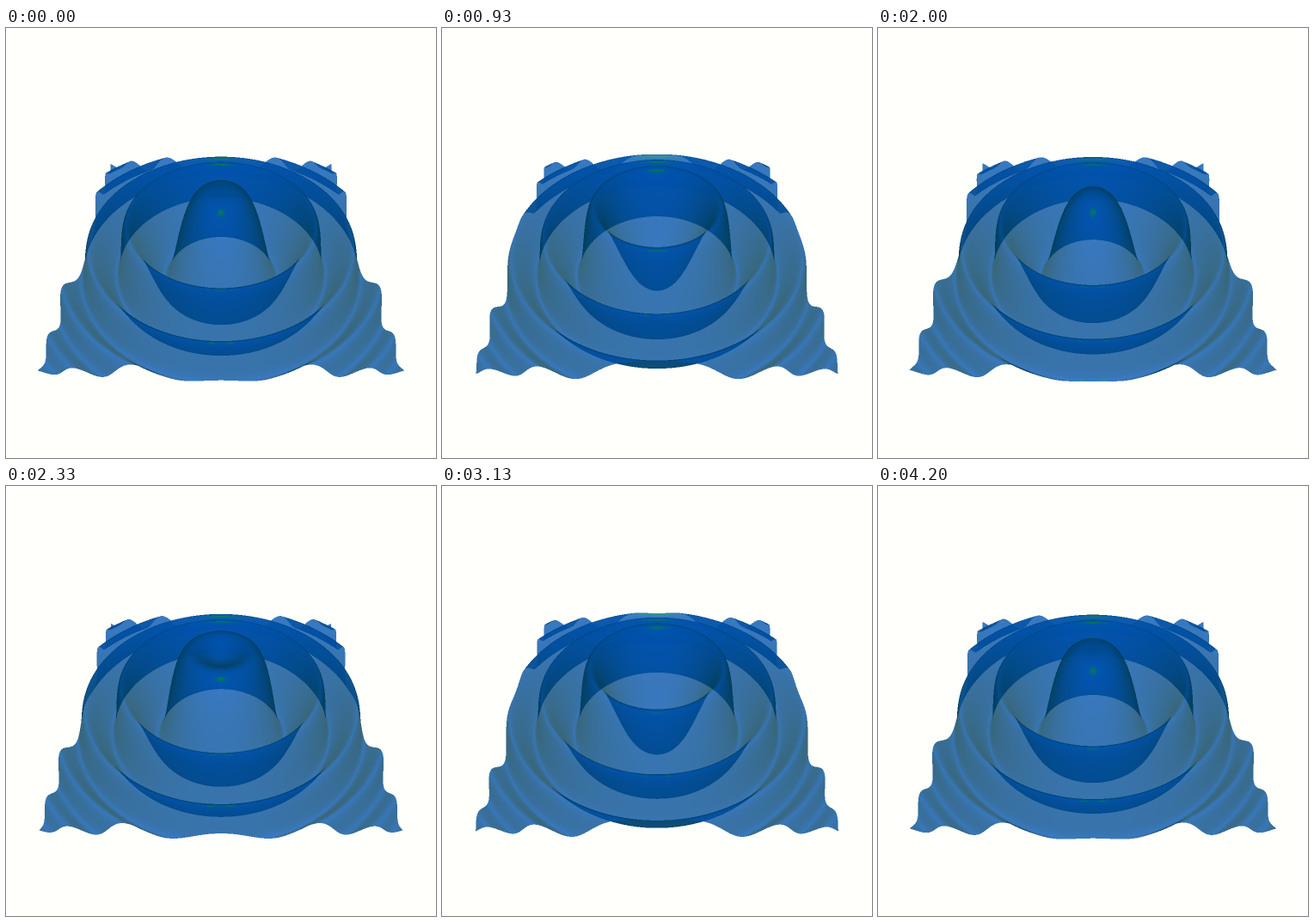
Recreate the animation shown at these times as an HTML page with a canvas. Size 500x500 px, loop 4270 ms.

```html
<!DOCTYPE html>
<html lang="en">
<head>
<meta charset="utf-8">
<title>Circular wave</title>
<style>
  html, body { margin: 0; width: 100%; height: 100%; overflow: hidden; background: #fffffb; }
  canvas { display: block; width: 500px; height: 500px; }
</style>
</head>
<body>
<canvas id="stage" width="500" height="500"></canvas>
<script>
const SIZE = 500, HALF = SIZE / 2, SCALE = 2;
const BUF_W = HALF * SCALE, BUF_H = SIZE * SCALE;
const PAPER = [255, 255, 251];

// Loop: 64 steps over two wave periods, first and last step alike
const LOOP = 4270, STEPS = 64, PERIODS = 2;

// Surface, in units where one period of the wave spans radius 0 to 1
const EXTENT = Math.sqrt(2.42), AMP = 0.765, DECAY = 0.6, TAU = 2 * Math.PI;
const CELLS = 160, COLS = CELLS + 1, ROWS = 2 * CELLS + 1;

// Camera at 45 degrees above the plane, with a headlight
const DIST = 4.446, FOCAL = 456, C45 = Math.SQRT1_2;
const EYE = [0, -DIST * C45, DIST * C45];
const ALPHA = 0.78;

const ctx = document.getElementById('stage').getContext('2d');
const buf = new Float32Array(BUF_W * BUF_H * 3);
const px = new Float64Array(COLS * ROWS);
const py = new Float64Array(COLS * ROWS);
const color = [0, 0, 0];
const cache = [];

const height = (q, phase) => AMP * Math.exp(-DECAY * q) * Math.cos(TAU * (q - phase));

function projectGrid(phase) {
  for (let j = 0, k = 0; j < ROWS; j++) {
    const y = EXTENT * (1 - j / CELLS);
    for (let i = 0; i < COLS; i++, k++) {
      const x = EXTENT * i / CELLS;
      const z = height(x * x + y * y, phase);
      const zoom = FOCAL / (DIST + (y - z) * C45);
      px[k] = x * zoom * SCALE - 0.5;
      py[k] = (HALF - (y + z) * C45 * zoom) * SCALE - 0.5;
    }
  }
}

function shade(x, y, phase) {
  const q = x * x + y * y;
  const angle = TAU * (q - phase);
  const env = AMP * Math.exp(-DECAY * q);
  const z = env * Math.cos(angle);
  const slope = 2 * env * (DECAY * Math.cos(angle) + TAU * Math.sin(angle));
  const nx = slope * x, ny = slope * y;
  const vx = EYE[0] - x, vy = EYE[1] - y, vz = EYE[2] - z;
  const facing = (nx * vx + ny * vy + vz) / (Math.hypot(nx, ny, 1) * Math.hypot(vx, vy, vz));
  const lit = Math.abs(facing);
  const gloss = facing > 0 ? 0.9 * Math.pow(facing, 190) : 0;
  const green = 58 + 26 * lit;
  const blue = 80 + 102 * lit;
  color[1] = green + (140 - green) * gloss;
  color[2] = blue + (55 - blue) * gloss;
}

// Half-open scan conversion, so neighbours never blend a pixel twice
function fillTriangle(a, b, c) {
  let t;
  if (py[a] > py[b]) { t = a; a = b; b = t; }
  if (py[b] > py[c]) { t = b; b = c; c = t; }
  if (py[a] > py[b]) { t = a; a = b; b = t; }
  const end = Math.min(BUF_H, Math.ceil(py[c]));
  for (let y = Math.max(0, Math.ceil(py[a])); y < end; y++) {
    const from = y < py[b] ? a : b, to = y < py[b] ? b : c;
    if (py[to] === py[from]) continue;
    const x1 = px[a] + (y - py[a]) * (px[c] - px[a]) / (py[c] - py[a]);
    const x2 = px[from] + (y - py[from]) * (px[to] - px[from]) / (py[to] - py[from]);
    const right = Math.min(BUF_W, Math.ceil(Math.max(x1, x2)));
    let x = Math.max(0, Math.ceil(Math.min(x1, x2)));
    for (let k = (y * BUF_W + x) * 3; x < right; x++, k += 3) {
      for (let ch = 0; ch < 3; ch++) buf[k + ch] += (color[ch] - buf[k + ch]) * ALPHA;
    }
  }
}

// Rows run far to near and cells run inwards: painter's order
function paintSurface(phase) {
  for (let k = 0; k < buf.length; k += 3) buf.set(PAPER, k);
  projectGrid(phase);
  for (let j = 0; j < ROWS - 1; j++) {
    const y = EXTENT * (1 - (j + 0.5) / CELLS);
    for (let i = CELLS - 1; i >= 0; i--) {
      const k = j * COLS + i;
      shade(EXTENT * (i + 0.5) / CELLS, y, phase);
      fillTriangle(k, k + 1, k + COLS);
      fillTriangle(k + 1, k + COLS, k + COLS + 1);
    }
  }
}

// Average the samples and mirror the right half
function resolve() {
  const image = ctx.createImageData(SIZE, SIZE);
  const out = image.data;
  for (let y = 0; y < SIZE; y++) {
    for (let x = 0; x < HALF; x++) {
      const right = (y * SIZE + HALF + x) * 4;
      const left = (y * SIZE + HALF - 1 - x) * 4;
      const k = (y * SCALE * BUF_W + x * SCALE) * 3, below = k + BUF_W * 3;
      for (let ch = 0; ch < 3; ch++) {
        out[right + ch] = out[left + ch] =
          (buf[k + ch] + buf[k + 3 + ch] + buf[below + ch] + buf[below + 3 + ch]) / 4;
      }
      out[right + 3] = out[left + 3] = 255;
    }
  }
  return image;
}

function picture(step) {
  if (!cache[step]) {
    paintSurface(PERIODS * step / (STEPS - 1));
    cache[step] = resolve();
  }
  return cache[step];
}

const start = performance.now();
let shown = -1;

function tick() {
  const time = (performance.now() - start) % LOOP;
  const step = Math.min(STEPS - 1, Math.floor((time + 5) * 0.015));
  if (step !== shown) {
    ctx.putImageData(picture(step), 0, 0);
    shown = step;
  }
  requestAnimationFrame(tick);
}
tick();
</script>
</body>
</html>
```
